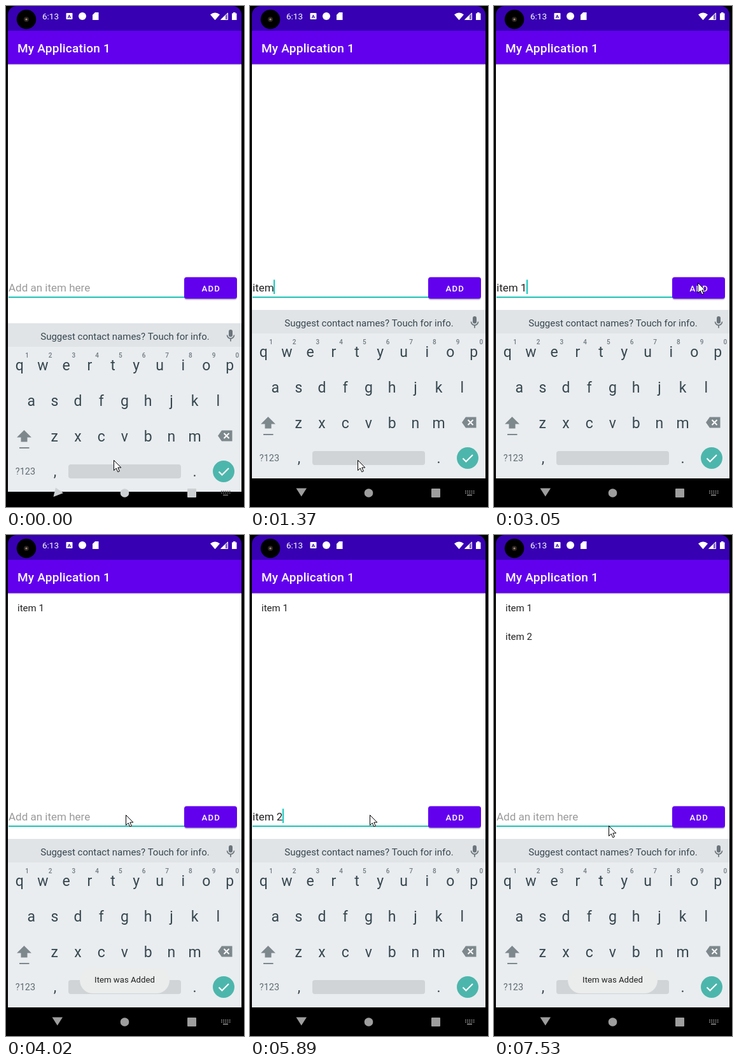
These frames come from a looping animation (374x788 px, 8 s). An HTML page:

```html
<!DOCTYPE html>
<html lang="en">
<head>
<meta charset="utf-8">
<title>Add items to a list</title>
<style>
  html, body { margin: 0; width: 100%; height: 100%; overflow: hidden; background: #000; }
  svg { display: block; font-family: Roboto, sans-serif; }
  text { white-space: pre; }
  .mid { text-anchor: middle; }
  .key { font-size: 23px; fill: #37474f; text-anchor: middle; }
  .hint { font-size: 10px; font-weight: 500; fill: #6f7a80; text-anchor: middle; }
</style>
</head>
<body>
<svg width="374" height="788" viewBox="0 0 374 788">
  <defs>
    <clipPath id="screen"><rect x="3" y="0" width="367" height="800" rx="14"/></clipPath>
    <linearGradient id="shade" x2="0" y2="1">
      <stop stop-color="#000" stop-opacity=".22"/><stop offset="1" stop-color="#000" stop-opacity="0"/>
    </linearGradient>
  </defs>
  <rect width="374" height="788"/>

  <g clip-path="url(#screen)">
    <rect x="3" y="39" width="367" height="470" fill="#fff"/>
    <rect x="3" width="367" height="39" fill="#3700b3"/>
    <rect x="3" y="39" width="367" height="52.5" fill="#6200ee"/>
    <rect x="3" y="91.5" width="367" height="2" fill="url(#shade)"/>
  </g>

  <!-- status bar -->
  <circle cx="32" cy="21" r="15.3"/>
  <circle cx="32" cy="21" r="4" fill="#2b2522"/>
  <circle cx="32" cy="21" r="1.6" fill="#a58a70"/>
  <g fill="#fff">
    <text x="57" y="21" font-size="13.5">6:13</text>
    <rect x="94.500" y="11" width="10" height="10" rx="1"/>
    <circle cx="120" cy="16" r="6"/>
    <path d="M140 10h5.500v12h-9.500v-8z"/>
    <path d="M321 13.500q7.500-6 15 0l-7.500 8.800z"/>
    <path d="M349 10v12h-12z" fill-opacity=".4"/>
    <path d="M348.500 11v10.500h-10.500zM344 16v5.500h-6z" fill="none" stroke="#fff"/>
    <path d="M344.500 14.500v7.500h-7.500z"/>
    <path d="M357 11.500v-1.500h3.500v1.500h2v10.500h-7.500v-10.500z"/>
    <text x="18" y="73" font-size="19" font-weight="500" letter-spacing=".24">My Application 1</text>
  </g>
  <text x="99.500" y="19" font-size="8" font-weight="700" fill="#3700b3" class="mid">A</text>

  <!-- list and input row -->
  <g id="items" font-size="15" fill="#222">
    <text x="18" y="120">item 1</text>
    <text x="18" y="165">item 2</text>
  </g>
  <rect x="4" y="457" width="277" height="2" fill="#20c1b6"/>
  <text id="hint" x="4" y="449" font-size="17" fill="#9a9a9a">Add an item here</text>
  <text id="typed" x="4" y="449" font-size="17" fill="#212121"></text>
  <rect id="caret" y="430.500" width="2" height="22.500" fill="#12c9bd"/>
  <rect x="280" y="428" width="83" height="34.500" rx="4" fill="#000" opacity=".2"/>
  <rect x="280" y="426.500" width="83" height="34" rx="4" fill="#6200ee"/>
  <rect id="press" x="280" y="426.500" width="83" height="34" rx="4" fill="#fff" opacity=".22"/>
  <text x="322.300" y="448.500" font-size="13.200" font-weight="500" letter-spacing="1.200" fill="#fff" class="mid">ADD</text>

  <!-- keyboard -->
  <g id="keyboard">
    <rect x="3" y="478" width="367" height="265" fill="#e9edf0"/>
    <rect x="3" y="478" width="367" height="37" fill="#e0e4e7"/>
    <text id="notice" x="187" y="504" font-size="15" fill="#37474f" class="mid">Suggest contact names? Touch for info.</text>
    <g fill="#6b757b">
      <rect x="350" y="488" width="6" height="11.500" rx="3"/>
      <path d="M347.500 496.500a5.500 5.500 0 0 0 11 0M353 502v4.500" fill="none" stroke="#6b757b" stroke-width="1.700"/>
    </g>
    <g id="keys"></g>
    <g fill="#7d888d">
      <path d="M28.500 646l11.500 11.500h-6.500v7h-10v-7h-6.500z"/>
      <rect x="21" y="673" width="15.500" height="2"/>
      <path d="M333 655l6-8.500h16.500v17h-16.500z"/>
    </g>
    <path d="M342.500 651l8 8m0-8l-8 8" stroke="#fff" stroke-width="2"/>
    <text x="30.500" y="716" font-size="14.500" fill="#5f6c72" class="mid">?123</text>
    <rect x="98" y="700" width="177" height="22" rx="4" fill="#d0d4d7"/>
    <circle cx="342" cy="711" r="17" fill="#4db6ac"/>
    <path d="M334.500 711.500l5 5l10.500-10.500" fill="none" stroke="#fff" stroke-width="2.200"/>
  </g>

  <!-- navigation bar -->
  <g id="nav">
    <path id="back" d="M72.500 758.500h16.500l-8.250 13z"/>
    <circle cx="186.500" cy="766" r="6.800"/>
    <rect x="285" y="759" width="14" height="14" rx="1"/>
  </g>
  <g id="switcher" fill="none" stroke-width="1.500">
    <path d="M338 763h14.500M338 766h14.500" stroke-dasharray="1.700 1.500"/>
    <path d="M341 769.300h8"/>
  </g>

  <g id="toast">
    <rect x="116" y="680" width="141" height="41" rx="20.500" fill="#ebecec"/>
    <text x="186.500" y="703.500" font-size="13.200" fill="#222" class="mid">Item was Added</text>
  </g>
  <path id="mouse" d="M.5.5v16l3.700-3.500 2.600 5.800 2.600-1.200-2.600-5.600h5z" fill="#fff" stroke="#000"/>
</svg>

<script>
const LOOP = 8000;
const el = Object.fromEntries([...document.querySelectorAll('svg [id]')].map(e => [e.id, e]));

function addLabel(cls, x, y, label) {
  const t = document.createElementNS('http://www.w3.org/2000/svg', 'text');
  t.setAttribute('class', cls);
  t.setAttribute('x', x);
  t.setAttribute('y', y);
  t.textContent = label;
  el.keys.append(t);
}
function addRow(cls, x, y, labels) {
  [...labels].forEach((label, i) => addLabel(cls, x + 36.7 * i, y, label));
}
addRow('key', 21.3, 551.5, 'qwertyuiop');
addRow('hint', 33, 531.5, '1234567890');
addRow('key', 39.7, 607.5, 'asdfghjkl');
addRow('key', 76.3, 663.5, 'zxcvbnm');
addLabel('key', 77, 719, ',');
addLabel('key', 296.5, 719, '.');

// Each step overrides part of the state from its time on.
const steps = [
  [0, { sliding: true, text: '', caret: false, notice: true, items: 0, toast: 0, press: false, mouse: [169, 714] }],
  [150, { sliding: false }],
  [430, { caret: true }],
  [950, { text: 'i' }],
  [1090, { text: 'it' }],
  [1230, { text: 'ite' }],
  [1370, { text: 'item' }],
  [1520, { text: 'item ', notice: false }],
  [1790, { notice: true }],
  [2060, { text: 'item 1' }],
  [2480, { caret: false }],
  [2640, { mouse: null }],
  [2930, { caret: true, mouse: [358, 445] }],
  [3050, { mouse: [320, 435] }],
  [3460, { press: true, text: '', items: 1 }],
  [3600, { press: false, toast: .5 }],
  [3740, { toast: 1 }],
  [3880, { mouse: [188, 440] }],
  [4020, { caret: false }],
  [4480, { caret: true, text: 'i' }],
  [4620, { text: 'it' }],
  [4760, { text: 'ite' }],
  [4890, { text: 'item' }],
  [5030, { text: 'item ', notice: false }],
  [5310, { notice: true }],
  [5450, { toast: .5 }],
  [5600, { toast: 0 }],
  [5740, { text: 'item 2' }],
  [6140, { caret: false }],
  [6410, { mouse: [215, 442] }],
  [6550, { mouse: [262, 446] }],
  [6690, { caret: true, mouse: [292, 449] }],
  [6830, { mouse: [305, 450] }],
  [6980, { press: true, text: '', items: 2 }],
  [7120, { press: false, toast: .5 }],
  [7270, { toast: 1 }],
  [7410, { mouse: [180, 457] }],
  [7530, { caret: false }]
];

const show = (e, on) => e.setAttribute('visibility', on ? 'visible' : 'hidden');

function render(s) {
  el.keyboard.setAttribute('transform', `translate(0 ${s.sliding ? 21 : 0})`);
  el.nav.setAttribute('fill', s.sliding ? '#ced1d3' : '#9e9e9e');
  el.back.setAttribute('d', s.sliding ? 'M78 757.5l12 8.500-15.500 6z' : 'M72.500 758.500h16.500l-8.250 13z');
  el.switcher.setAttribute('stroke', s.sliding ? '#777' : '#9e9e9e');
  el.typed.textContent = s.text;
  show(el.hint, !s.text);
  el.caret.setAttribute('x', Math.floor(4 + (s.text ? el.typed.getComputedTextLength() : 0)));
  show(el.caret, s.caret);
  show(el.notice, s.notice);
  show(el.press, s.press);
  [...el.items.children].forEach((item, i) => show(item, i < s.items));
  el.toast.setAttribute('opacity', s.toast);
  show(el.mouse, s.mouse);
  if (s.mouse) el.mouse.setAttribute('transform', `translate(${s.mouse})`);
}

const start = performance.now();
function tick() {
  const time = (performance.now() - start) % LOOP;
  render(Object.assign({}, ...steps.filter(([at]) => at <= time).map(([, change]) => change)));
  requestAnimationFrame(tick);
}
tick();
</script>
</body>
</html>
```
